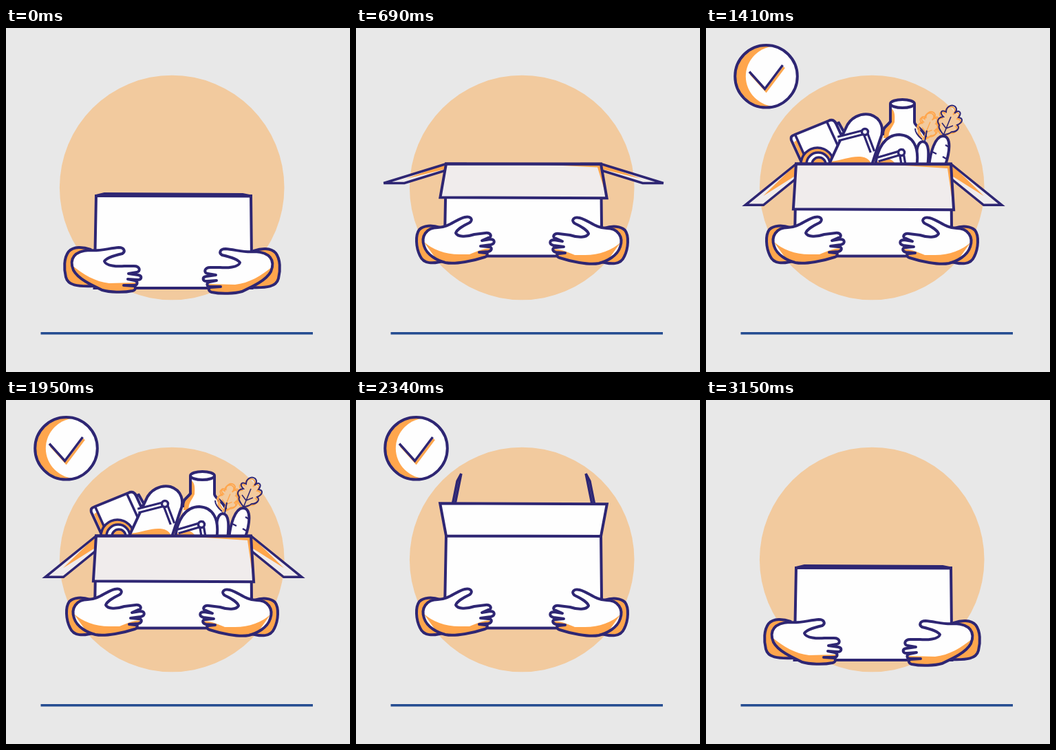
An HTML page with a canvas for the animation above (3.51 s loop, 500 by 500 pixels).

```html
<!DOCTYPE html>
<html lang="en">
<head>
<meta charset="utf-8">
<title>Food box</title>
<style>
html, body { margin: 0; width: 100%; height: 100%; overflow: hidden; background: #e8e8e8 }
canvas { display: block }
</style>
</head>
<body>
<canvas id="stage" width="500" height="500"></canvas>
<script>
const ctx = document.getElementById('stage').getContext('2d');
const NAVY = '#2e2673', ORANGE = '#ffa64d', WHITE = '#fefefe', INNER = '#f0ecec';
const LOOP = 3510, LIFT = 46.5, RAD = Math.PI / 180;

const mix = (a, b, p) => a + (b - a) * p;
const ease = (t, a, b) => {
  const x = Math.min(1, Math.max(0, (t - a) / (b - a)));
  return x * x * (3 - 2 * x);
};
// Rises over [a, b], falls back over [c, d]
const pulse = (t, a, b, c, d) => ease(t, a, b) - ease(t, c, d);

function shape(d, fill, stroke = NAVY, width = 4) {
  const path = new Path2D(d);
  if (fill) { ctx.fillStyle = fill; ctx.fill(path); }
  if (stroke) { ctx.strokeStyle = stroke; ctx.lineWidth = width; ctx.stroke(path); }
}
function disc(x, y, rx, ry, fill, stroke, width = 4) {
  ctx.beginPath();
  ctx.ellipse(x, y, rx, ry, 0, 0, 7);
  if (fill) { ctx.fillStyle = fill; ctx.fill(); }
  if (stroke) { ctx.strokeStyle = stroke; ctx.lineWidth = width; ctx.stroke(); }
}
function placed(draw, x, y, sx = 1, sy = 1) {
  ctx.save();
  ctx.translate(x, y);
  ctx.scale(sx, sy);
  draw();
  ctx.restore();
}
function morph(a, b, p) {
  const to = b.match(/[\d.]+/g);
  let i = 0;
  return a.replace(/[\d.]+/g, n => mix(+n, +to[i++], p).toFixed(2));
}

// Each part: resting pose, gripping pose
const cuff = [
  'M123 322C112 318 98 317 91 325C84 334 84 350 87 362C90 374 103 376 128 375Z',
  'M122 290C110 286 98 287 92 293C86 301 87 319 93 331C98 343 111 344 133 337Z'];
const palm = [
  'M121 323C135 325 150 320 164 319C172 319 174 325 169 328C160 330 146 334 143 339C145 346 162 347 172 346L186 346C195 346 196 354 190 355L178 357L192 359C198 360 198 366 191 366L177 365L187 367C192 368 192 374 186 374L171 374L186 375C190 377 188 381 184 382C170 385 150 384 140 381C125 374 105 365 98 352C91 335 100 324 121 323Z',
  'M119 290C135 290 145 278 158 275C167 273 171 279 165 283C157 287 147 292 145 298C148 304 160 304 172 300L188 298C196 297 199 304 192 305L183 309L195 307C202 307 203 313 196 315L181 317L192 318C199 318 198 324 192 325L179 326L189 327C192 328 191 332 187 333C172 338 145 344 130 341C118 338 103 330 99 317C94 303 102 290 119 290Z'];
const shade = [
  'M96 345C112 358 130 369 150 371L188 370C192 374 188 381 184 382C170 385 150 384 140 381C125 374 105 365 96 345Z',
  'M98 310C110 322 130 329 150 329C165 329 180 323 192 318C197 322 191 332 187 333C172 338 145 344 130 341C118 338 103 330 98 310Z'];

function hand(p) {
  const outline = morph(...palm, p);
  shape(morph(...cuff, p), ORANGE);
  shape(outline, WHITE, null);
  shape(morph(...shade, p), ORANGE, null);
  shape(outline, null);
}

function sideFlap(angle, y) {
  const c = Math.cos(angle * RAD), s = Math.sin(angle * RAD), up = Math.max(0, s);
  const len = 95 - 14 * up, ox = 10 - 21 * c, oy = -11 * up;
  const tx = 131 + len * c, ty = y - len * s;
  const d = `M131 ${y}L${tx} ${ty}L${tx + ox} ${ty + oy}L${131 + ox} ${y + oy}Z`;
  shape(d, INNER, null);
  if (angle > 180)
    shape(`M131 ${y}L${131 + len * c * .65} ${y - len * s * .78}L${131 + ox} ${y}Z`, ORANGE, null);
  shape(d, null, NAVY, 3.5);
}

function frontFlap(angle, y) {
  const out = -12 * Math.cos(angle * RAD), tip = y - 70 * Math.sin(angle * RAD);
  const d = `M131 ${y}L356 ${y + .5}L${356 + out} ${tip + 1}L${131 - out} ${tip}Z`;
  const inside = angle > 180;
  shape(d, inside ? INNER : WHITE, null);
  if (inside) {
    const h = tip - y;
    shape(`M250 ${y}L351 ${y + h * .1}L${355 + out} ${tip - h * .05}L356 ${y}Z`, ORANGE, null);
  }
  shape(d, null);
}

const LEAF = 'M0 0C-4 -5 -8 -10 -6 -14C-10 -20 -8 -25 0 -26C-6 -32 -3 -37 4 -33C4 -40 11 -45 17 -41C21 -37 18 -33 16 -31C22 -37 28 -33 22 -25C29 -24 29 -18 20 -14C25 -10 20 -4 12 -4C8 -1 4 0 0 0';
const leaf = (x, y, front, size) => placed(() => {
  placed(() => shape(LEAF, null, ORANGE, 2), -2, 2);
  shape(LEAF, null, front, 2);
  shape('M-2 6L11 -26M4 -9L-2 -17M4 -9L14 -13', null, front, 1.6);
}, x, y, size, size);

function carrots() {
  leaf(316, 160, ORANGE, .9);
  leaf(345, 155, NAVY, 1);
  shape('M318 165L321 149M314 162C307 156 304 151 304 146', null, NAVY, 2);
  shape('M304 202C306 180 306 166 315 165C325 166 324 184 322 202Z', WHITE);
  shape('M324 202C326 180 333 158 344 157C358 157 354 182 347 202Z', WHITE);
  shape('M348 170L353 173M329 180L335 183M344 187L349 190', null, NAVY, 2.5);
}
function bottle() {
  const d = 'M268 110L268 136C262 144 257 146 257 156L257 202L320 202L320 160C318 146 304 144 303 137L303 110Z';
  shape(d, WHITE, null);
  shape('M268 116C274 119 275 126 274 137C270 146 264 151 266 160L258 160L258 148L268 136Z', ORANGE, null);
  shape('M268 110L268 136C262 144 257 143 257 156M303 110L303 137C304 144 316 146 320 160', null);
  disc(285.5, 110, 17.5, 6, WHITE, NAVY);
}
function carton() {
  shape('M184 141L193 138L201 152L192 158Z', WHITE);
  shape('M142 202L124 163C123 158 124 157 129 155L178 135C184 132 187 135 189 139L205 174L195 202Z', WHITE);
  shape('M128 166L143 200L149 200L133 162Z', ORANGE, null);
  shape('M130 156L147 194M176 137L193 174', null, NAVY, 3.5);
  disc(162, 198, 24, 24, ORANGE, NAVY, 3.5);
  disc(163, 198, 17, 17, WHITE, NAVY, 3.5);
  disc(164, 198, 10, 10, ORANGE, NAVY, 3.5);
}
function ring(x, y, d) {
  shape(d, null, NAVY, 9);
  shape(d, null, WHITE, 2.5);
  disc(x, y, 4.5, 4.5, WHITE, NAVY, 3.5);
}
function tallTin() {
  const d = 'M177 202L203 146C209 130 225 123 239 126C255 131 260 147 253 162L240 202Z';
  shape(d, WHITE, null);
  shape('M181 194C198 192 212 186 224 187C235 188 240 193 241 202L178 202Z', ORANGE, null);
  shape(d, null);
  ring(231, 151, 'M192 161L231 151L242 180');
}
function shortTin() {
  const d = 'M246 202C248 176 260 155 281 155C300 156 311 172 306 202Z';
  shape(d, WHITE, null);
  shape('M248 195C258 188 270 186 278 202L247 202Z', ORANGE, null);
  shape(d, null);
  ring(284, 181, 'M250 191L284 181L288 204');
}

// Drawing, sideways start, delay
const food = [[bottle, 0, 50], [carrots, -22, 20], [carton, 18, 0], [tallTin, 0, 10], [shortTin, 0, 30]];

function groceries(t) {
  ctx.save();
  ctx.beginPath();
  ctx.rect(0, 0, 500, 200);
  ctx.clip();
  for (const [draw, dx, delay] of food) {
    const p = pulse(t, 740 + delay, 1050 + delay, 1950, 2250);
    if (p > 0) placed(draw, dx * (1 - p), 112 * (1 - p));
  }
  ctx.restore();
}

function badge(t) {
  let r = 49.5 * ease(t, 840, 1020);
  r -= 4.2 * pulse(t, 1020, 1140, 2720, 2850);
  r *= 1 - ease(t, 2850, 3125);
  if (r < .3) return;
  placed(() => {
    disc(0, 0, 45, 45, ORANGE);
    ctx.save();
    ctx.beginPath();
    ctx.arc(0, 0, 45, 0, 7);
    ctx.clip();
    disc(15.5, 0, 45, 44, WHITE);
    ctx.restore();
    disc(0, 0, 45, 45, null, NAVY);
  }, 87.5, 70.3, r / 45, r / 45);

  const total = 77, from = total * ease(t, 2520, 2960), to = total * ease(t, 970, 1410);
  if (to - from < .1) return;
  ctx.save();
  ctx.lineCap = 'butt';
  ctx.lineJoin = 'miter';
  ctx.setLineDash([to - from, 200]);
  ctx.lineDashOffset = -from;
  const tick = 'M63 63.5L85.5 88.5L111.5 54';
  placed(() => shape(tick, null, ORANGE, 3.5), 2, 3);
  shape(tick, null, NAVY, 3.5);
  ctx.restore();
}

function draw(t) {
  const lift = pulse(t, 20, 480, 2490, 3060);
  const front = 2.5 + 247.5 * pulse(t, 330, 780, 2145, 2560);
  const side = 219 * pulse(t, 320, 780, 2090, 2510);
  const dy = -LIFT * lift, top = 244 + dy, base = 378 + dy;

  ctx.fillStyle = '#e8e8e8';
  ctx.fillRect(0, 0, 500, 500);
  disc(241.2, 232, 163.3, 163.3, '#f2ca9e');
  shape('M50.5 443.7H446', null, '#254c91', 3.6);
  ctx.lineJoin = 'miter';
  ctx.lineCap = 'butt';
  ctx.miterLimit = 4;

  if (side > 3) {
    sideFlap(side, top);
    placed(() => sideFlap(side, top), 487, 0, -1);
  }
  groceries(t);
  shape(`M131 ${top}L356 ${top}L357.5 ${base}L128.5 ${base}Z`, WHITE);
  frontFlap(front, top);

  ctx.lineJoin = ctx.lineCap = 'round';
  hand(lift);
  placed(() => hand(lift), 483, mix(2, 1, lift), -1);
  badge(t);
  ctx.lineJoin = 'miter';
  ctx.lineCap = 'butt';
}

const start = performance.now();
function tickFrame() {
  // The motion advances in steps of 30 ms
  const t = (performance.now() - start) % LOOP;
  draw(Math.floor(t / 30) * 30);
  requestAnimationFrame(tickFrame);
}
tickFrame();
</script>
</body>
</html>
```
